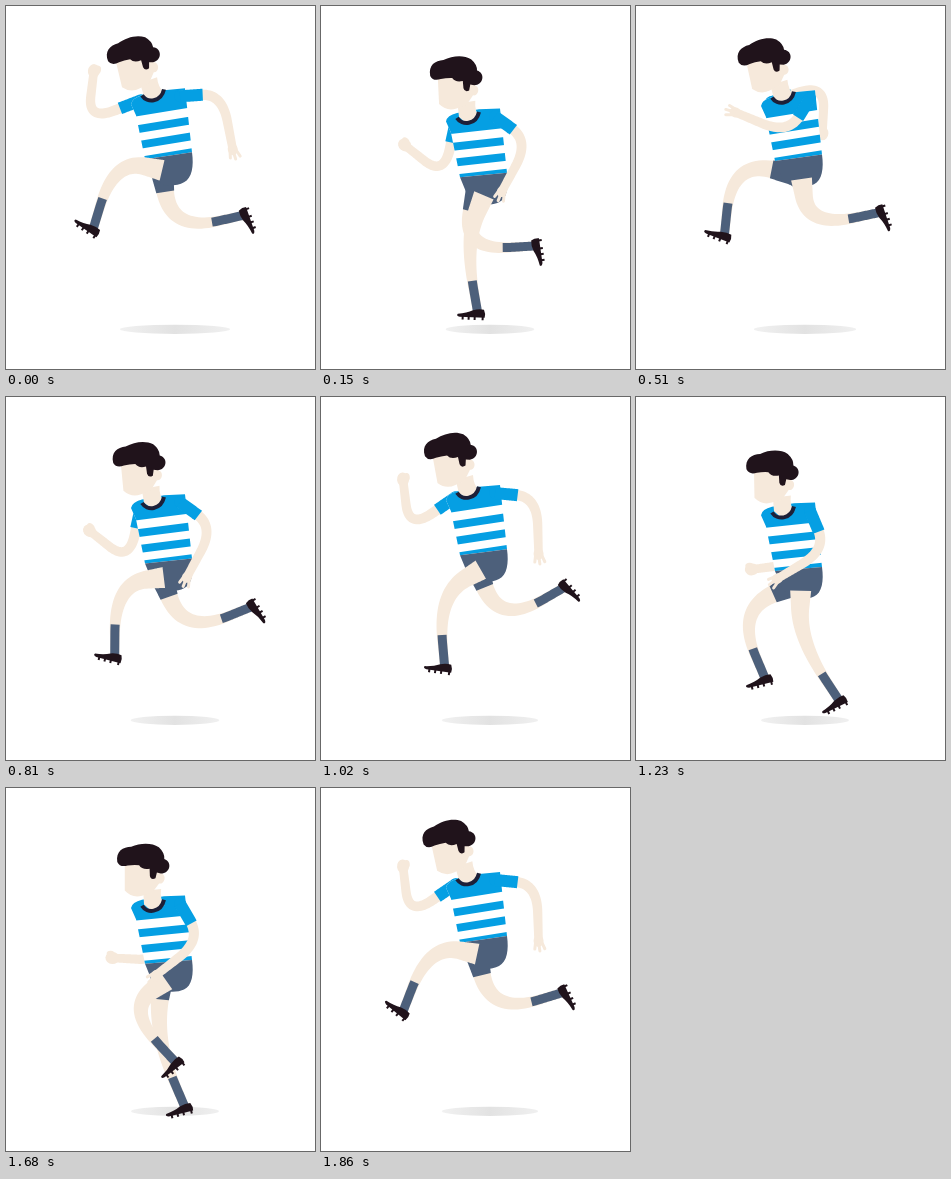
Write an HTML page with a canvas that moves like this. It is 309 by 363 pixels and loops after 1.89 s.

```html
<!DOCTYPE html>
<html lang="en">
<head>
<meta charset="utf-8">
<title>Runner</title>
<style>
html, body { margin: 0; width: 100%; height: 100%; overflow: hidden; background: #fff; }
canvas { display: block; width: 309px; height: 363px; }
</style>
</head>
<body>
<canvas id="stage" width="309" height="363"></canvas>
<script>
const ctx = document.getElementById('stage').getContext('2d');
const LOOP = 1890, STEP = 30, CYCLE = 32, DEG = Math.PI / 180;
const SKIN = '#f6e9db', BLUE = '#059fe3', NAVY = '#4d607b', DARK = '#20131b', COLLAR = '#1d2038';

// One stride, shared by both legs: step, thigh and shin angle (0 is down, + is back).
const STRIDE = [[1, -101, -6], [2, -60, 5], [6, -15, 12], [10, 4, 47], [11, 20, 112],
  [17, 8, 102], [18, 22, 120], [22, -30, 80], [26, -75, 9], [31, -104, -23]];

// Swing of an arm: mean and range of the upper and lower angles, and lengths.
const NEAR_ARM = { x: 174, y: 90, upper: [30, 64], lower: [-52, 63], sizes: [42, 56], open: true };
const FAR_ARM = { x: 135, y: 94, upper: [22, 91], lower: [-93, 94], sizes: [57, 50], open: false };

// Periodic monotone spline through the stride.
function stride(step) {
  const n = STRIDE.length, f = (step - 1 + CYCLE) % CYCLE + 1;
  const at = (k, j) => STRIDE[(k + n) % n][j] + (j ? 0 : CYCLE * Math.floor(k / n));
  let i = n - 1;
  while (STRIDE[i][0] > f) i--;
  const span = at(i + 1, 0) - at(i, 0), u = (f - at(i, 0)) / span, u2 = u * u, u3 = u2 * u;
  return [1, 2].map(j => {
    const slope = k => (at(k + 1, j) - at(k, j)) / (at(k + 1, 0) - at(k, 0));
    const tangent = k => {
      const p = slope(k - 1), q = slope(k);
      return p * q <= 0 ? 0 : 2 * p * q / (p + q);
    };
    return at(i, j) + (at(i + 1, j) - at(i, j)) * (3 * u2 - 2 * u3)
      + span * (tangent(i) * (u3 - 2 * u2 + u) + tangent(i + 1) * (u3 - u2));
  });
}

function fill(path, color) {
  ctx.fillStyle = color;
  ctx.fill(new Path2D(path));
}

function oval(x, y, rx, ry, color) {
  ctx.fillStyle = color;
  ctx.beginPath();
  ctx.ellipse(x, y, rx, ry, 0, 0, 7);
  ctx.fill();
}

const reach = ([x, y], angle, size) => [x + size * Math.sin(angle * DEG), y + size * Math.cos(angle * DEG)];

// Two straight parts joined by a soft bend; each point knows its distance d.
function limb(a, b, c, soft) {
  const mix = (p, q, t) => [p[0] + (q[0] - p[0]) * t, p[1] + (q[1] - p[1]) * t];
  const p = mix(b, a, soft), q = mix(b, c, soft), pts = [];
  for (let i = 0; i < 24; i++) pts.push(mix(a, p, i / 24));
  for (let i = 0; i < 24; i++) pts.push(mix(mix(p, b, i / 24), mix(b, q, i / 24), i / 24));
  for (let i = 0; i <= 24; i++) pts.push(mix(q, c, i / 24));
  let d = 0;
  return pts.map(([x, y], i) => {
    if (i) d += Math.hypot(x - pts[i - 1][0], y - pts[i - 1][1]);
    return { x, y, d };
  });
}

function ribbon(pts, from, to, width, color) {
  const part = pts.filter(p => p.d >= from && p.d <= to);
  const left = [], right = [];
  part.forEach((p, i) => {
    const a = part[Math.max(0, i - 1)], b = part[Math.min(part.length - 1, i + 1)];
    const w = width((p.d - from) / (to - from)) / 2 / (Math.hypot(b.x - a.x, b.y - a.y) || 1);
    const nx = (a.y - b.y) * w, ny = (b.x - a.x) * w;
    left.push([p.x + nx, p.y + ny]);
    right.unshift([p.x - nx, p.y - ny]);
  });
  ctx.fillStyle = color;
  ctx.beginPath();
  left.concat(right).forEach(p => ctx.lineTo(p[0], p[1]));
  ctx.fill();
}

function shoe(x, y, angle) {
  ctx.save();
  ctx.translate(x, y);
  ctx.rotate(angle * DEG);
  fill('M6-4Q8 0 7 4L-18 4Q-22 3-20 1Q-11 0-5-3Q1-5 6-4Z', DARK);
  for (const s of [-16, -10, -4, 4]) ctx.fillRect(s, 3, 2, 3.5);
  ctx.restore();
}

function leg(hip, [thigh, shin], sizes, shorts) {
  const knee = reach(hip, thigh, sizes[0]), ankle = reach(knee, shin, sizes[1]);
  const pts = limb(hip, knee, ankle, .66), len = pts[pts.length - 1].d;
  ribbon(pts, 0, len, t => 9 + 12 * Math.pow(1 - t, 1.7), SKIN);
  if (shorts) ribbon(pts, 0, 21, t => 23 - 5 * t, NAVY);
  ribbon(pts, len - 36, len, () => 9, NAVY);
  ribbon(pts, len - 35, len - 32.5, () => 9, '#dde2e8');
  shoe(...ankle, 14 - 1.2 * shin);
}

function arm({ x, y, upper, lower, sizes, open }, dy, swing) {
  const shoulder = [x, y + dy], angle = lower[0] + lower[1] * swing;
  const elbow = reach(shoulder, upper[0] + upper[1] * swing, sizes[0]);
  const hand = reach(elbow, angle, sizes[1]);
  const pts = limb(shoulder, elbow, hand, .5), len = pts[pts.length - 1].d;
  ribbon(pts, 0, len, t => 11 - 2.5 * t, SKIN);
  oval(...shoulder, 6, 6, BLUE);
  ribbon(pts, 0, 23, () => 12, BLUE);
  ctx.save();
  ctx.translate(...hand);
  ctx.rotate((90 - angle) * DEG);
  if (open) {
    oval(1, 0, 6, 5, SKIN);
    ctx.strokeStyle = SKIN;
    ctx.lineWidth = 3;
    ctx.lineCap = 'round';
    ctx.beginPath();
    for (const side of [-1, 0, 1]) {
      ctx.moveTo(2, 3 * side);
      ctx.lineTo(11 - 2 * Math.abs(side), 5 * side - 1);
    }
    ctx.stroke();
  } else {
    oval(0, 0, 7, 6, SKIN);
    oval(2, 4, 4, 3, SKIN);
  }
  ctx.restore();
}

function torso() {
  const body = 'M136 89Q126 92 125 98L130 109L139 153L186 146L179 82L158 84Z';
  fill(body, '#fff');
  ctx.save();
  ctx.clip(new Path2D(body));
  fill('M110 70L200 55V98.5L110 113.5Z', BLUE);
  for (let i = 0; i < 3; i++) {
    const y = 122.5 + 16 * i;
    fill(`M110 ${y}l90-15v8l-90 15Z`, BLUE);
  }
  ctx.restore();
  fill('M139 153L186 146C188 160 186 172 178 176Q171 180 158 179L147 172Z', NAVY);
}

function head(turn) {
  ctx.save();
  ctx.translate(148, 89);
  ctx.rotate(turn);
  ctx.translate(-148, -90);
  fill('M134 78L151 72Q152 82 158 87L147 96L138 91Z', SKIN);
  fill('M109 53L116 82Q125 88 134 83L143 78L149 64L146 48Z', SKIN);
  oval(148, 62, 4, 5, SKIN);
  fill('M102 56C98 46 104 40 112 38C120 32 131 29 139 32Q146 36 147 42'
    + 'C156 43 156 55 147 57L143 57L143 63Q139 66 137 62L135 55Q128 58 124 54Q118 55 113 57Q106 61 102 56Z', DARK);
  ctx.restore();
}

function collar() {
  ctx.strokeStyle = COLLAR;
  ctx.lineWidth = 4;
  ctx.lineCap = 'butt';
  ctx.stroke(new Path2D('M136 89C141 97 155 96 158 83'));
}

function shadow(width) {
  const g = ctx.createLinearGradient(169 - width / 2, 0, 169 + width / 2, 0);
  g.addColorStop(0, '#f1f1f1');
  g.addColorStop(.5, '#e2e2e2');
  g.addColorStop(1, '#f0f0f0');
  oval(169, 323.3, width / 2, 4.6, g);
}

function draw(step) {
  const turn = step / CYCLE * 2 * Math.PI;
  const low = Math.sin(turn + .11) ** 2, dy = 26 * low, tilt = .07 * low;
  const swing = Math.cos(turn + .22 * Math.sin(2 * turn));
  const near = stride(step), back = near[0] + 104;

  ctx.fillStyle = '#fff';
  ctx.fillRect(0, 0, 309, 363);
  shadow(88 + 22 * (1 - Math.abs(Math.sin(turn))) ** 2);
  arm(FAR_ARM, dy, -swing);
  leg([156, 165 + dy], stride(step + CYCLE / 2), [61, 75], true);

  ctx.save();
  ctx.transform(1, tilt, 0, 1, 0, dy - tilt * 180);
  torso();
  ctx.restore();

  ctx.save();
  ctx.translate(0, dy * 1.12);
  head(.24 * low);
  collar();
  ctx.restore();

  leg([156 + back * .085, 164 + dy + back * .06], near, [49, 74], false);
  arm(NEAR_ARM, dy, swing);
}

function tick() {
  draw(Math.floor(performance.now() % LOOP / STEP) % CYCLE);
  requestAnimationFrame(tick);
}
tick();
</script>
</body>
</html>
```
